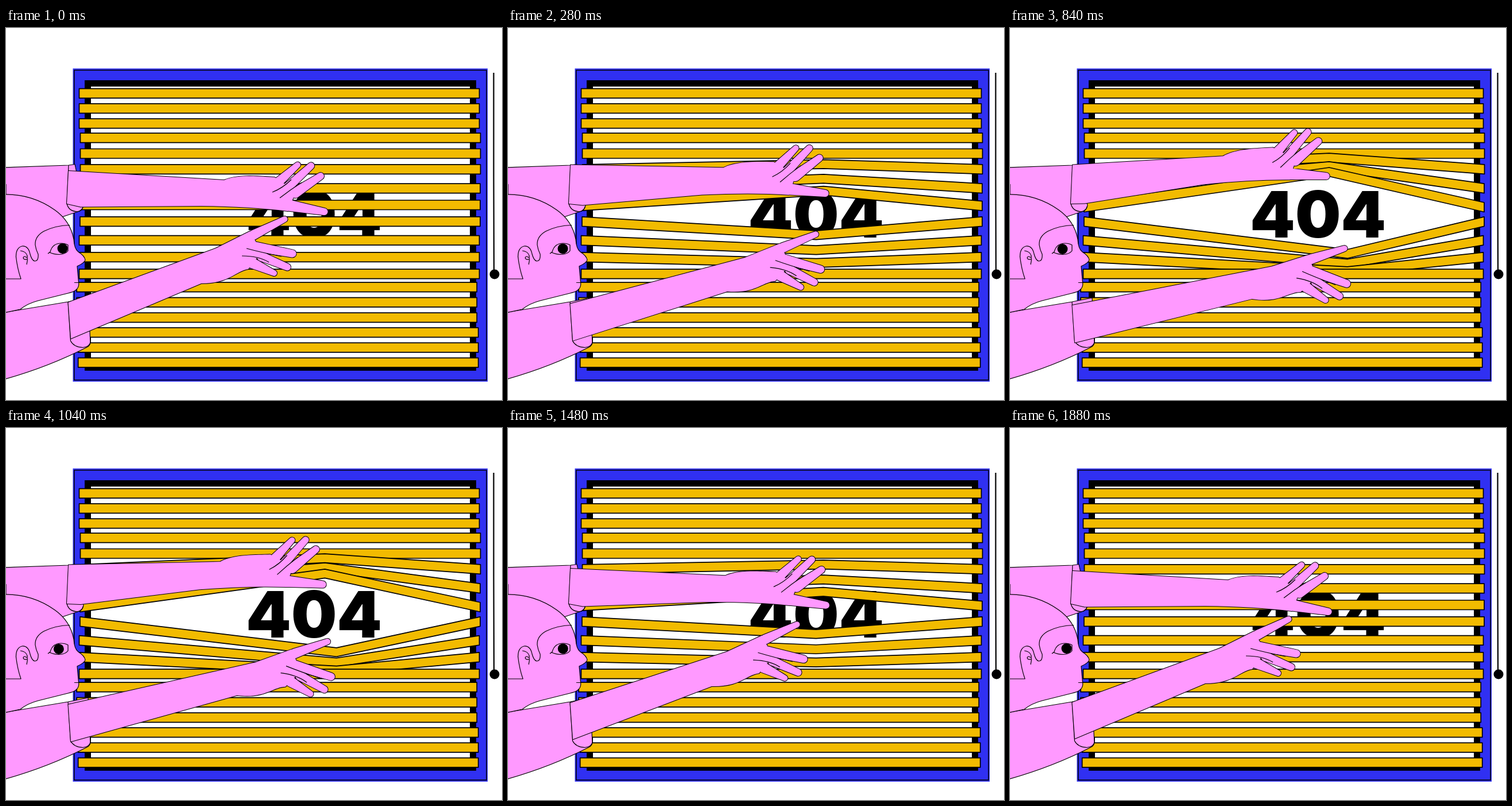
An HTML page with a canvas that plays this animation: 864x648 px, repeating every 1920 ms.

```html
<!DOCTYPE html>
<html lang="en">
<head>
<meta charset="utf-8">
<title>404</title>
<style>
  html, body { margin: 0; width: 100%; height: 100%; overflow: hidden; background: #fff; }
  canvas { display: block; }
</style>
</head>
<body>
<canvas id="stage" width="864" height="648"></canvas>
<script>
const ctx = document.getElementById('stage').getContext('2d');
const LOOP = 1920, STEP = 40;
const PINK = '#ff99ff', YELLOW = '#f2bb00', BLUE = '#3030f2';

// Arms shoot out, then sink back; the slats swing open and shut around them
function reachAt(t) {
  if (t < 840) return 1 - (1 - t / 840) ** 1.8;
  const p = Math.min(1, (t - 840) / 1040);
  return (1 - p) ** 2.5 * (1 + 1.6 * p);
}
const openAt = t => Math.max(0, Math.cos((t - 870) / 820 * Math.PI / 2));

function shape(d, fill, width = 1.2) {
  const path = new Path2D(d);
  if (fill) { ctx.fillStyle = fill; ctx.fill(path); }
  ctx.lineWidth = width;
  ctx.stroke(path);
}

function rect(x, y, w, h, fill) {
  ctx.fillStyle = fill;
  ctx.fillRect(x, y, w, h);
}

function disc(x, y, r) {
  ctx.fillStyle = '#000';
  ctx.beginPath();
  ctx.arc(x, y, r, 0, 7);
  ctx.fill();
}

// Straight bar, or one bent by `bend` pixels at peak
function slat(x, y, bend = 0, peak = x + 348, drop = 0) {
  const right = x + 697, end = y + drop, mid = y + bend;
  shape(`M${x} ${end}L${peak} ${mid}L${right} ${end}v16.5L${peak} ${mid + (bend ? 15.5 : 16.5)}L${x} ${end + 16.5}Z`,
    YELLOW, 1.7);
}

function drawBlinds(open) {
  // Groups of three slats: left, top, pitch
  const groups = [[127.5, 105.6, 26.3], [129.5, 183.2, 27.3], [129, 271.2, 28.8],
    [127.5, 361.7, 29.2], [123.2, 443.2, 26.5], [125.7, 522.2, 26.2]];
  groups.forEach(([x, top, pitch], g) => {
    for (let k = 0; k < 3; k++) {
      const i = g * 3 + k, y = top + k * pitch;
      const rank = i < 8 ? i - 4 : 11 - i;      // slats nearest the gap bend most
      if (rank < 1 || rank > 3) slat(x, y);
      else if (i < 8) slat(x, y, -(1 + 18.7 * rank) * open, 545 + 11 * open, i === 7 ? 4 * open : 0);
      else slat(x, y, (9 + 16 * rank) * open, 536 + 52 * open ** 5);
    }
  });
}

function drawWindow(open) {
  rect(116.5, 70.5, 722.5, 545.5, BLUE);
  shape('M118.8 73.5H837V613.3H118.8Z', null, 1.5);
  rect(137, 91, 682, 506, '#000');
  rect(148, 102, 660, 489, '#fff');
  ctx.fillStyle = '#000';
  ctx.font = '900 112px Inter, sans-serif';
  ctx.textAlign = 'center';
  ctx.fillText('404', 536.5, 364.6);
  drawBlinds(open);
  shape('M849.5 78V258L850 422', null, 2.2);
  disc(851, 429, 8.5);
}

function drawHead(open) {
  shape(`M-3 290Q45 289 85 317Q112 336 118 368Q119 385 126 390Q137 397 138 404
    Q137 409 124 415L126.5 443Q128 452 121 457Q117 460 108 462L56 475Q37 480 25 490L-3 496Z`, PINK);
  shape(`M111 343.5Q86 344 66 354Q50 363 51 378Q52 386 56 394Q57 406 50 406Q45 405 42 394
    Q39 379 28 380Q17 383 17.5 399Q20 420 26 437H-3`);
  shape('M25 388Q35 389 37 397Q38 405 36 412M36.5 403Q30 404 30 400Q32 396 36 400M119 443.5H126.5');
  shape('M73 393L77 390Q81 375 96 375Q103 375 108 378V388Q104 394 92 394.5Q82 394 76 391');
  disc(98.5 - 7 * open, 384 + open, 9);
}

// Tapered finger with round ends, added to the current path
function finger(x, y, r, tipX, tipY, tipR) {
  const angle = Math.atan2(tipY - y, tipX - x), side = Math.PI / 2;
  ctx.moveTo(x + r * Math.sin(angle), y - r * Math.cos(angle));
  ctx.arc(tipX, tipY, tipR, angle - side, angle + side);
  ctx.arc(x, y, r, angle + side, angle + 3 * side);
  ctx.closePath();
}

// The forearm stays at the sleeve while the hand shifts and turns about its pivot
function arm({ pivot: [px, py], shift: [dx, dy], turn, palm, fingers, creases }, a, top, ...bottom) {
  const inHand = paint => {
    ctx.save();
    ctx.translate(px + dx * a, py + dy * a);
    ctx.rotate(turn * a * Math.PI / 180);
    ctx.translate(-px, -py);
    paint();
    ctx.restore();
  };
  ctx.beginPath();
  ctx.moveTo(...top);
  inHand(palm);
  bottom.forEach(p => ctx.lineTo(...p));
  ctx.closePath();
  inHand(fingers);
  // Outline first, so the fill hides the lines inside the joined shape
  ctx.lineWidth = 2;
  ctx.stroke();
  ctx.fillStyle = PINK;
  ctx.fill();
  inHand(() => shape(creases));
}

const upper = {
  pivot: [477, 296], shift: [-6, -53], turn: -6.5,
  palm() {
    ctx.lineTo(380, 265);
    ctx.bezierCurveTo(405, 254, 445, 259, 468, 260);
    ctx.lineTo(505, 285);
    ctx.lineTo(491, 319);
    ctx.quadraticCurveTo(426, 311, 340, 310);
  },
  fingers() {
    finger(476, 267, 8, 508, 238.5, 5);
    finger(490, 278, 8, 531.5, 240, 5.7);
    finger(504, 287, 9, 548, 258, 6);
    finger(490, 308.5, 10, 554.5, 320, 6);
  },
  creases: 'M464 286Q482 279 497 264M477 296Q495 282 515 269'
};

const lower = {
  pivot: [419, 384], shift: [90, 40], turn: 9,
  palm() {
    ctx.lineTo(365, 384);
    ctx.lineTo(425, 354);
    ctx.lineTo(445, 390);
    ctx.lineTo(422, 420);
    ctx.bezierCurveTo(400, 423, 390, 445, 340, 445);
  },
  fingers() {
    finger(431, 360.5, 8.5, 485.5, 333, 5);
    finger(435, 381, 8.5, 499, 393, 6.5);
    finger(445, 398, 8, 490, 416.5, 6);
    finger(430, 410, 9, 467, 427, 5);
  },
  creases: 'M419 384Q445 391 480 398M411 397Q440 397 458 408'
};

function draw(t) {
  const reach = reachAt(t), open = openAt(t);
  rect(0, 0, 864, 648, '#fff');
  drawWindow(open);

  // Upper sleeve, lower sleeve, head
  shape('M-3 243L109 239L120 237.5L135 309Q134 317 125 320L98 329L-3 340Z', PINK);
  shape('M-3 495.5L108 477L143 470L147 548Q146 554 141 556Q75 590 -3 612Z', PINK);
  shape('M0 272V291');
  drawHead(open);
  shape('M109 239L106 306Q109 319 124 320Q133 319 134 311');
  shape('M108 477L112.5 545Q118 556 134 556.5Q146 555 147 547');

  arm(upper, reach, [109, Math.max(238.5, 249 - 22 * reach)], [130, 311.5 - 6 * reach], [106, 306]);
  arm(lower, reach, [108.5, 478 + 5 * reach], [113, 541 + 7 * reach]);
}

ctx.strokeStyle = '#000';
ctx.lineJoin = 'round';
const start = performance.now();
function tick() {
  const t = (performance.now() - start) % LOOP;
  draw(t - t % STEP);
  requestAnimationFrame(tick);
}
tick();
</script>
</body>
</html>
```
